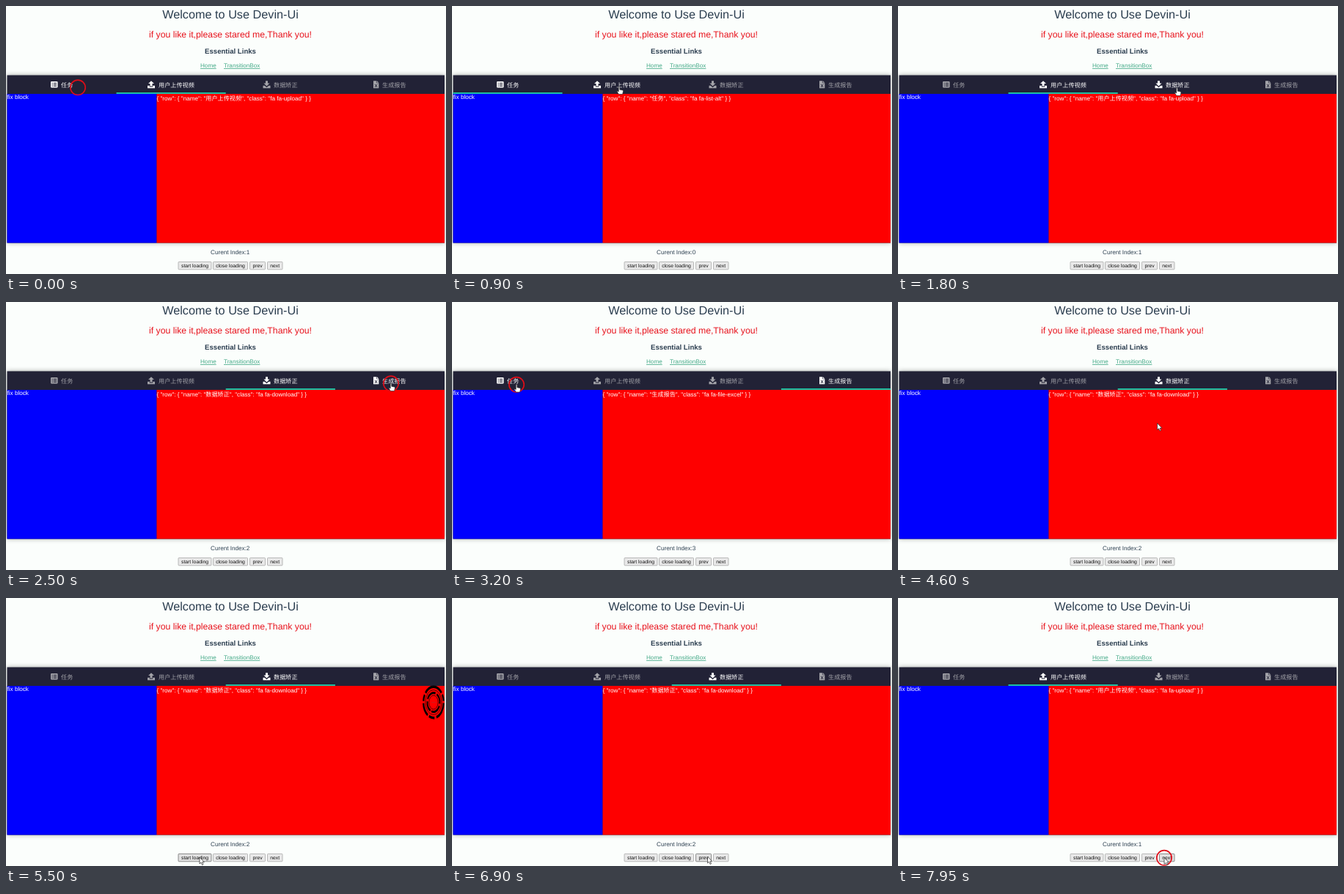
These frames come from a looping animation (600 px wide and 366 px high, 8000 ms). An HTML page:

```html
<!DOCTYPE html>
<html lang="en">
<head>
<meta charset="utf-8">
<title>Tabs demo</title>
<style>
html, body { margin: 0; width: 100%; height: 100%; overflow: hidden; background: #fbfefc; }
svg { display: block; }
text {
  font-family: "Liberation Sans", "Noto Sans CJK SC", "Noto Sans CJK", sans-serif;
  font-size: 8.15px; fill: #2c3e50; text-rendering: geometricPrecision; white-space: pre;
}
.mid { text-anchor: middle; }
.white text, text.white { fill: #fff; }
.link { fill: #45aa88; text-decoration: underline; }
.tab { color: #a3a3a9; }
.tab.on { color: #fff; }
.tab text, .tab path { fill: currentColor; }
.tab .cut { fill: none; stroke: #222236; }
.button rect { fill: #e9e9e9; stroke: #a9a9a9; stroke-width: .8; }
.button.on rect { fill: #e2e2e2; stroke: #707070; }
.button text { font-size: 6.8px; fill: #111; }
.shadow { filter: drop-shadow(0 0 3px rgba(0, 0, 0, .35)); }
</style>
</head>
<body>
<svg width="600" height="366" viewBox="0 0 600 366">
  <defs><clipPath id="panel"><rect x="205" y="120" width="393" height="203.5"/></clipPath></defs>
  <rect width="600" height="366" fill="#fbfefc"/>
  <text class="mid" x="306" y="17" style="font-size:16.25px">Welcome to Use Devin-Ui</text>
  <text class="mid" x="306" y="43" style="font-size:12.25px;fill:#e8121c">if you like it,please stared me,Thank you!</text>
  <text class="mid" x="306" y="65" style="font-size:9.6px;font-weight:bold">Essential Links</text>
  <text class="link" x="265" y="84">Home</text>
  <text class="link" x="297" y="84">TransitionBox</text>

  <rect class="shadow" x="1.5" y="94.5" width="596.5" height="229" fill="#222236"/>
  <g id="tabs"></g>
  <rect id="bar" y="118" width="149.2" height="2" fill="#1cc0a2"/>
  <rect x="1.5" y="120" width="204" height="203.5" fill="#0000fe"/>
  <rect x="205.5" y="120" width="392.5" height="203.5" fill="#fe0000"/>
  <text class="white" x="1.5" y="127">fix block</text>
  <g class="white" clip-path="url(#panel)">
    <text id="oldRow" y="128.5"></text>
    <text id="newRow" y="128.5"></text>
  </g>

  <g id="loader" transform="translate(583 142.5) scale(.65 1)" fill="none" stroke="#0a0000">
    <circle id="outer" r="21.2" stroke-width="3.6" stroke-dasharray="19 3 9 3 26 4 12 3"/>
    <circle r="17" stroke-width=".8"/>
    <circle id="inner" r="13" stroke-width="3" stroke-dasharray="15 3 20 3"/>
    <circle r="9.5" stroke-width=".8"/>
    <path d="M-4 0h8" stroke="#a33" stroke-width="1.2" stroke-dasharray="1.5 1.7"/>
  </g>

  <text id="counter" class="mid" x="305.7" y="339"></text>
  <g id="buttons"></g>

  <circle id="ring" r="10.2" fill="none" stroke="#e00d18" stroke-width="1.6"/>
  <path id="hand" fill="#fff" stroke="#222" stroke-width=".6"
    d="M-.8 .6Q0-.5 .8 .6V4.2L4.6 5Q5.6 5.3 5.4 6.6L4.6 10.5H-.6L-3 6.8Q-2.8 5.5-.8 7Z"/>
  <path id="arrow" fill="#fff" stroke="#222" stroke-width=".7"
    d="M0 0V9L2 7.2 3.5 10.5 5 9.8 3.6 6.7H6.3Z"/>
</svg>
<script>
const LOOP = 8000, SLIDE = 500, PANEL_X = 205.5, PANEL_W = 392.5, TAB_W = 149.2;
const $ = id => document.getElementById(id);

const tabs = [
  { name: '任务', css: 'list-alt', icon: 61, text: 75,
    art: '<path d="M1 .8h7.5q1 0 1 1v6.4q0 1-1 1H1q-1 0-1-1V1.8q0-1 1-1z"/><path class="cut" d="M1.5 3h1.2m1 0H8M1.5 5h1.2m1 0H8M1.5 7h1.2m1 0H8"/>' },
  { name: '用户上传视频', css: 'upload', icon: 193, text: 208,
    art: '<path d="M5 0 9 3.8H6.5V7.3h-3V3.8H1zM0 6.5h2.8v1.7h4.4V6.5H10V10H0z"/>' },
  { name: '数据矫正', css: 'download', icon: 350.5, text: 365,
    art: '<path d="M3.5 0h3v3.3H9L5 7.2 1 3.3h2.5zM0 6.5h2.2L5 9l2.8-2.5H10V10H0z"/>' },
  { name: '生成报告', css: 'file-excel', icon: 501, text: 513,
    art: '<path d="M0 0h4.4v3h2.9v7H0zM5 0 7.3 2.4H5z"/><path class="cut" d="M2 4.5 5.2 8.7M5.2 4.5 2 8.7"/>' }
];
const buttons = [
  ['start loading', 235, 45], ['close loading', 282.5, 47],
  ['prev', 332.5, 21], ['next', 356.5, 20.5]
];

// [time, selected tab]
const picks = [[-SLIDE, 1], [100, 0], [1000, 1], [1900, 2], [2550, 3], [3300, 0], [4050, 2], [7100, 1]];
// [time, x, y] of the pointer tip
const moves = [
  [0, 98, 111], [500, 98, 111], [850, 228, 110], [1300, 228, 110], [1750, 380.5, 112],
  [2150, 380.5, 112], [2450, 525, 111], [2800, 525, 111], [3120, 88, 112.5], [3600, 88, 112.5],
  [3900, 380, 110], [4400, 380, 110], [5050, 264, 354], [5700, 264, 354], [6100, 305, 354],
  [6500, 305, 354], [6850, 348.5, 353], [7500, 348.5, 353], [7800, 363, 354.5], [8000, 363, 354.5]
];
const clicks = [[0, 150], [950, 1100], [1850, 2000], [2500, 2650], [3150, 3300], [4050, 4200],
  [5150, 5300], [6200, 6350], [7000, 7150], [7850, 8000]];
const hidden = [[0, 50], [3950, 4050]];
const loading = [[5250, 6300]];

const within = (spans, t) => spans.some(([a, b]) => t >= a && t < b);
const show = (el, on) => el.setAttribute('visibility', on ? 'visible' : 'hidden');
const easeOut = x => 1 - Math.pow(1 - x, 2.4);
const smooth = x => x * x * (3 - 2 * x);
const mix = (a, b, k) => a + (b - a) * k;
const rowText = i => `{ "row": { "name": "${tabs[i].name}", "class": "fa fa-${tabs[i].css}" } }`;

$('tabs').innerHTML = tabs.map(tab => `<g class="tab">
  <g transform="translate(${tab.icon} 102.3)">${tab.art}</g>
  <text x="${tab.text}" y="110.5">${tab.name}</text></g>`).join('');
$('buttons').innerHTML = buttons.map(([label, x, w]) => `<g class="button">
  <rect x="${x}" y="349.4" width="${w}" height="10.4" rx=".8"/>
  <text class="mid" x="${x + w / 2}" y="357">${label}</text></g>`).join('');

function pointerAt(t) {
  const n = Math.max(1, moves.findIndex(m => m[0] > t));
  const [t0, x0, y0] = moves[n - 1], [t1, x1, y1] = moves[n];
  const k = smooth((t - t0) / (t1 - t0));
  return [mix(x0, x1, k), mix(y0, y1, k)];
}

function render(t) {
  const n = picks.filter(p => p[0] <= t).length - 1;
  const [start, index] = picks[n];
  const last = n ? picks[n - 1][1] : index;
  const k = easeOut(Math.min(1, (t - start) / SLIDE));
  const side = index >= last ? 1 : -1;

  $('bar').setAttribute('x', 1.3 + TAB_W * mix(last, index, k));
  $('oldRow').textContent = k < 1 ? rowText(last) : '';
  $('oldRow').setAttribute('x', PANEL_X - side * k * PANEL_W);
  $('newRow').textContent = rowText(index);
  $('newRow').setAttribute('x', PANEL_X + side * (1 - k) * PANEL_W);
  $('counter').textContent = 'Curent Index:' + index;

  const [x, y] = pointerAt(t);
  const overTabs = y > 94 && y < 120;
  const hover = overTabs ? Math.floor((x - 1.3) / TAB_W) : -1;
  [...$('tabs').children].forEach((el, i) => el.classList.toggle('on', i === index || i === hover));
  [...$('buttons').children].forEach((el, i) => {
    const [, left, w] = buttons[i];
    el.classList.toggle('on', y > 349 && y < 360 && x > left && x < left + w);
  });

  const visible = !within(hidden, t);
  show($('hand'), visible && overTabs);
  show($('arrow'), visible && !overTabs);
  for (const id of ['hand', 'arrow']) $(id).setAttribute('transform', `translate(${x} ${y})`);
  show($('ring'), within(clicks, t));
  $('ring').setAttribute('cx', x);
  $('ring').setAttribute('cy', y + .3);

  show($('loader'), within(loading, t));
  $('outer').setAttribute('transform', `rotate(${t * .18})`);
  $('inner').setAttribute('transform', `rotate(${-t * .24})`);
}

const began = performance.now();
function tick() {
  render((performance.now() - began) % LOOP);
  requestAnimationFrame(tick);
}
tick();
</script>
</body>
</html>
```
